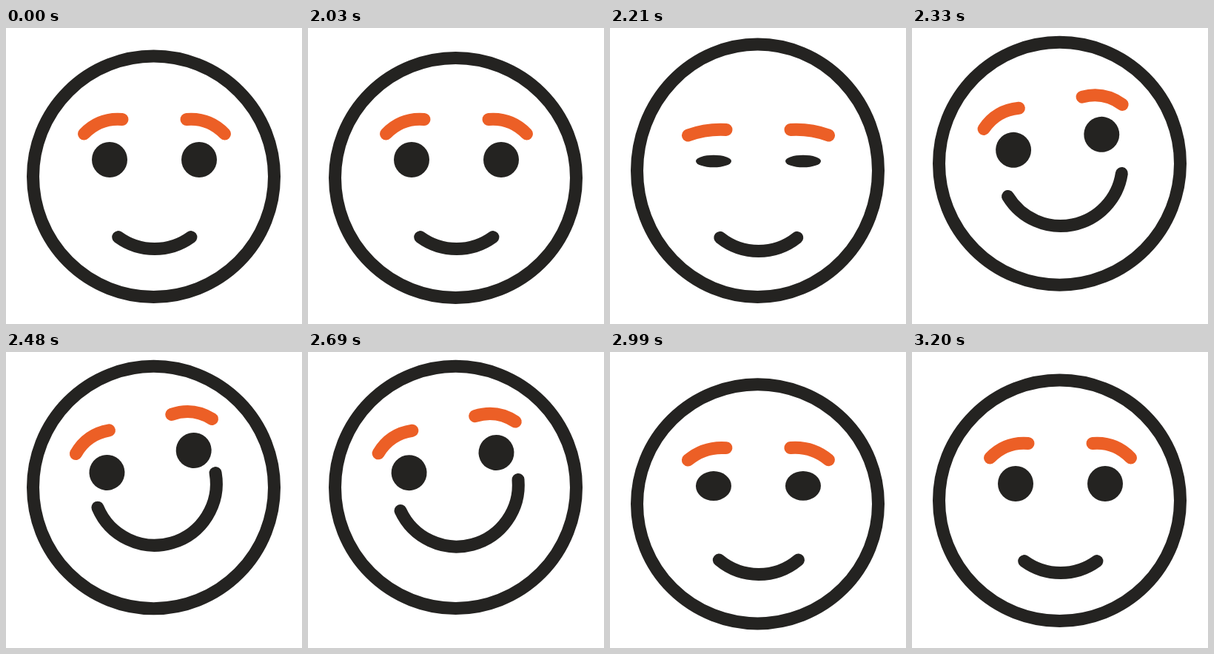
Recreate the animation shown at these times as an HTML page. Size 400 by 400 pixels, loop 3830 ms.

```html
<!DOCTYPE html>
<html lang="en">
<head>
<meta charset="utf-8">
<title>Smiling face</title>
<style>
  html, body { margin: 0; width: 100%; height: 100%; overflow: hidden; background: #fff; }
  svg { display: block; width: 100vw; height: 100vh; }
  .line { fill: none; stroke: #242321; stroke-width: 17; stroke-linecap: round; }
  .brow { stroke: #ec5f26; }
  .eye { fill: #242321; }
</style>
</head>
<body>
<svg viewBox="0 0 400 400">
  <ellipse id="face" class="line" cx="199.5" rx="163"/>
  <g id="features">
    <path id="browL" class="line brow"/>
    <path id="browR" class="line brow"/>
    <ellipse class="eye" cx="-60.5" cy="-22" rx="24"/>
    <ellipse class="eye" cx="60.5" cy="-22" rx="24"/>
  </g>
  <path id="mouth" class="line"/>
</svg>
<script>
const LOOP = 3830, START = 2030, STEP = 30;
const CX = 200.5, CY = 200, MOUTH_R = 83.5;

// Each track is a list of [time, value] keys.
const tracks = {
  top: [[2000, 29.5], [2030, 32], [2120, 48], [2210, 13.5], [2270, 9.5], [2330, 10.8],
        [2690, 10.8], [2870, 24.5], [2960, 37], [3070, 27.5], [3200, 29.5]],
  bottom: [[2000, 372], [2030, 373], [2120, 381], [2210, 372], [2330, 355.7],
           [2690, 355], [2870, 379], [2900, 380], [3070, 371.5], [3200, 372]],
  tilt: [[2210, 0], [2330, 10], [2510, 14.5], [2690, 13], [2870, 2.9], [3010, 0]],
  lift: [[2030, 0], [2130, 6], [2210, 2], [2330, -24], [2510, -31], [2690, -29],
         [2870, -16], [2980, 3], [3100, 0]],
  blink: [[2060, 0], [2210, 1], [2320, 0], [2720, 0], [2870, 0.73], [2910, 1], [3030, 0]],
  smile: [[2090, 36], [2210, 38.5], [2330, 70], [2510, 84], [2690, 80], [2870, 55], [3060, 36]],
  mouthY: [[2030, 215], [2130, 220], [2210, 218], [2330, 184], [2510, 177.5], [2690, 179.5],
           [2870, 200.5], [2980, 217], [3100, 215]]
};

const $ = id => document.getElementById(id);
const eyes = document.querySelectorAll('.eye');
const mix = (a, b, k) => a + (b - a) * k;

const slope = (keys, i) => (keys[i + 1][1] - keys[i][1]) / (keys[i + 1][0] - keys[i][0]);

// Flat at the ends and at peaks, so the curve never overshoots its keys.
function tangent(keys, i) {
  if (i === 0 || i === keys.length - 1) return 0;
  const a = slope(keys, i - 1), b = slope(keys, i);
  return a * b <= 0 ? 0 : 2 * a * b / (a + b);
}

function sample(keys, t) {
  const last = keys.length - 1;
  if (t <= keys[0][0]) return keys[0][1];
  if (t >= keys[last][0]) return keys[last][1];
  let i = 0;
  while (keys[i + 1][0] < t) i++;
  const [t0, a] = keys[i], [t1, b] = keys[i + 1];
  const span = t1 - t0, u = (t - t0) / span, v = 1 - u;
  return a * v * v * (1 + 2 * u) + b * u * u * (3 - 2 * u)
    + span * u * v * (tangent(keys, i) * v - tangent(keys, i + 1) * u);
}

function browPath(side, blink) {
  const ctrlX = mix(74, 70, blink) * side, ctrlY = mix(-79, -66, blink);
  return `M${95 * side} -57Q${ctrlX} ${ctrlY} ${43.5 * side} ${mix(-76.5, -64.5, blink)}`;
}

function mouthPath(y, half, tilt) {
  const point = deg => {
    const a = deg * Math.PI / 180;
    return `${CX + 0.3 + MOUTH_R * Math.cos(a)} ${y + MOUTH_R * Math.sin(a)}`;
  };
  return `M${point(90 + half - tilt)}A${MOUTH_R} ${MOUTH_R} 0 0 0 ${point(90 - half - tilt)}`;
}

function draw(time) {
  const t = START + Math.floor((time % LOOP - START) / STEP) * STEP;
  const p = {};
  for (const name in tracks) p[name] = sample(tracks[name], t);

  $('face').setAttribute('cy', (p.top + p.bottom) / 2);
  $('face').setAttribute('ry', (p.bottom - p.top) / 2 - 8.5);
  $('features').setAttribute('transform', `translate(${CX} ${CY + p.lift}) rotate(${-p.tilt})`);
  $('browL').setAttribute('d', browPath(-1, p.blink));
  $('browR').setAttribute('d', browPath(1, p.blink));
  eyes.forEach(eye => eye.setAttribute('ry', mix(24, 8.3, p.blink)));
  $('mouth').setAttribute('d', mouthPath(p.mouthY, p.smile, p.tilt * 1.14));
}

const begin = performance.now();
function tick() {
  draw(performance.now() - begin);
  requestAnimationFrame(tick);
}
tick();
</script>
</body>
</html>
```
